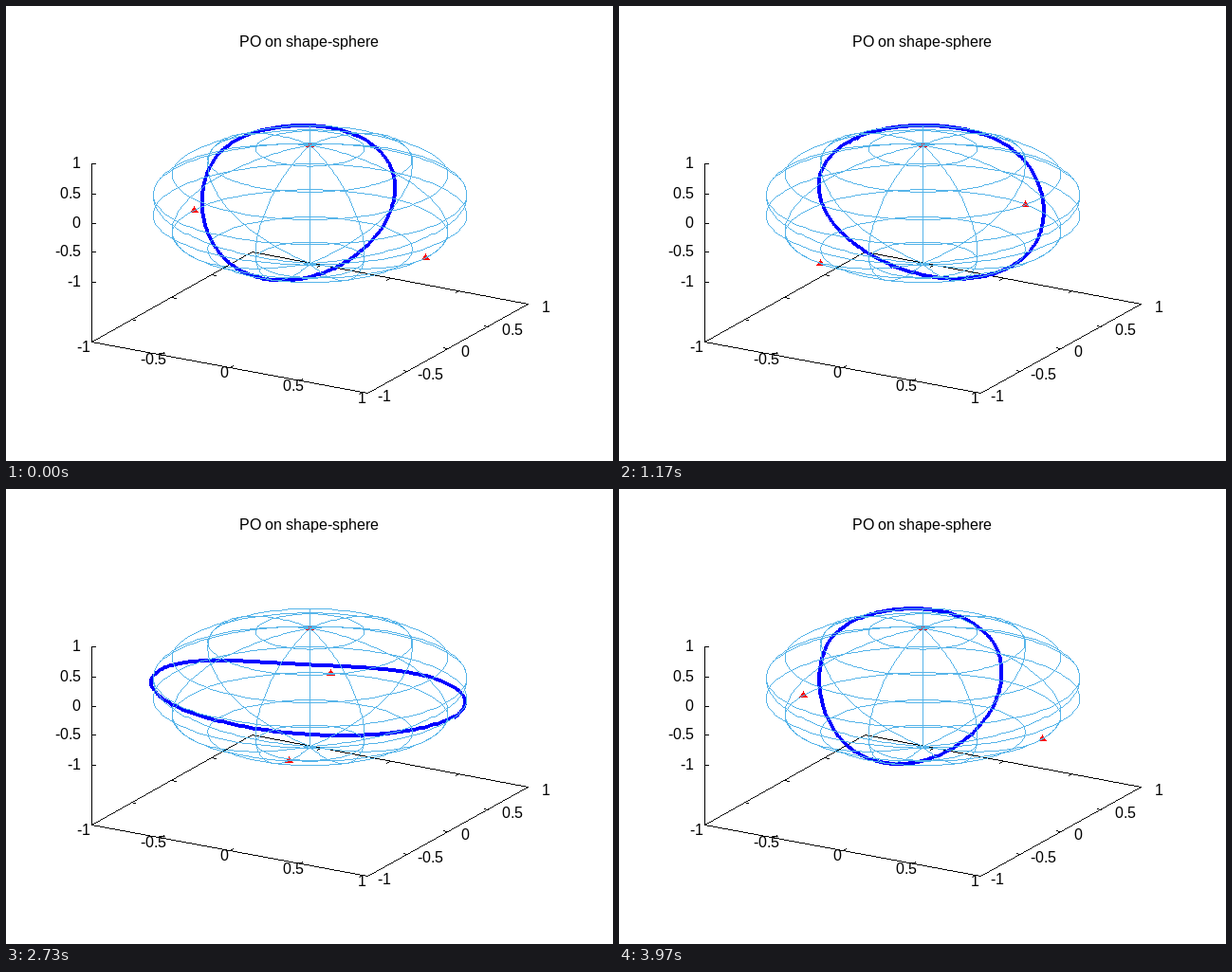
These frames come from a looping animation (640x480 px, 4.01 s). An HTML page with a canvas:

```html
<!DOCTYPE html>
<html lang="en">
<head>
<meta charset="utf-8">
<title>PO on shape-sphere</title>
<style>
html, body { margin: 0; width: 100%; height: 100%; overflow: hidden; background: #fff; }
canvas { display: block; }
</style>
</head>
<body>
<canvas id="stage" width="640" height="480"></canvas>
<script>
const W = 640, H = 480, LOOP = 4010, FRAMES = 120;
const RAD = Math.PI / 180;
const ctx = document.getElementById('stage').getContext('2d');

// View tilted by 60 and turned by 30 degrees, on whole pixels around the centre
const SX = 168.5, SY = 109, FLOOR = -2, MID = -0.5;
const C30 = Math.cos(30 * RAD), S30 = 0.5;
const project = (x, y, z) => [
  W / 2 + Math.trunc(SX * (x * C30 + y * S30)),
  H / 2 + Math.trunc(SY * ((x * S30 - y * C30) / 2 - C30 * (z - MID) / 1.5))
];

function layer() {
  const c = document.createElement('canvas');
  c.width = W;
  c.height = H;
  return c.getContext('2d');
}

// Hard-edged line, widened across its main direction
function line(g, a, b, thick = 1) {
  const [x0, y0] = a.map(Math.round), [x1, y1] = b.map(Math.round);
  const dx = x1 - x0, dy = y1 - y0;
  const n = Math.max(Math.abs(dx), Math.abs(dy));
  const flat = Math.abs(dx) >= Math.abs(dy);
  const wide = n ? Math.floor(thick * Math.hypot(dx, dy) / n + 1e-6) : thick;
  const shift = wide >> 1;
  for (let i = 0; i <= n; i++) {
    const x = Math.round(x0 + (n ? dx * i / n : 0));
    const y = Math.round(y0 + (n ? dy * i / n : 0));
    if (flat) g.fillRect(x, y - shift, 1, wide);
    else g.fillRect(x - shift, y, wide, 1);
  }
}

function path(g, at, steps, thick) {
  let last = at(0);
  for (let i = 1; i <= steps; i++) {
    const next = at(i / steps);
    line(g, last, next, thick);
    last = next;
  }
}

// Text with every glyph on a whole pixel; align: 0 left, 0.5 centre, 1 right
function label(g, text, x, y, align) {
  const chars = [...text];
  const steps = chars.map(c => Math.round(g.measureText(c).width));
  let pen = Math.round(x - align * steps.reduce((a, b) => a + b));
  chars.forEach((c, i) => {
    g.fillText(c, pen, y);
    pen += steps[i];
  });
}

function drawAxes(g) {
  g.fillStyle = '#000';
  const TIC = 4;
  const floor = (x, y) => project(x, y, FLOOR);
  const corners = [floor(-1, -1), floor(1, -1), floor(1, 1), floor(-1, 1)];
  corners.forEach((c, i) => line(g, c, corners[(i + 1) % 4]));
  line(g, corners[0], project(-1, -1, 1));

  const tic = ([x, y], dx, dy) => line(g, [x, y], [x + dx * TIC, y + dy * TIC]);
  g.font = '16px "Liberation Sans", Arial, sans-serif';
  label(g, 'PO on shape-sphere', 319.5, 43, 0.5);

  for (const v of [-1, -0.5, 0, 0.5, 1]) {
    const text = (v < 0 ? '' : ' ') + v;
    const px = floor(v, -1), py = floor(1, v), pz = project(-1, -1, v);
    if (Math.abs(v) < 1) {
      tic(px, 0.87, -0.48);
      tic(floor(v, 1), -0.87, 0.48);
      tic(floor(-1, v), 0.98, 0.18);
      tic(py, -0.98, -0.18);
    }
    tic(pz, 1, 0);
    label(g, text, px[0] - 8, px[1] + 11, 0.5);
    label(g, text, py[0] + 11, py[1] + 9, 0);
    label(g, text, pz[0] - 11, pz[1] + 5, 1);
  }
}

function drawSphere(g) {
  g.fillStyle = '#56b4e9';
  const at = (lon, lat) => project(
    Math.cos(lat * RAD) * Math.cos(lon * RAD),
    Math.cos(lat * RAD) * Math.sin(lon * RAD),
    Math.sin(lat * RAD)
  );
  for (let lat = -70; lat <= 70; lat += 20) path(g, t => at(360 * t, lat), 99);
  for (let lon = 0; lon < 360; lon += 40) path(g, t => at(lon, 180 * t - 90), 99);
}

// Point of the orbit on the unit sphere, symmetric in y
function orbit(t) {
  const s = 2 * Math.PI * t;
  const x = -0.12 - 0.355 * Math.cos(s) - 0.05 * Math.cos(2 * s) - 0.01 * Math.cos(3 * s);
  const r = Math.sqrt(1 - x * x);
  return [x, r * Math.sin(s), r * Math.cos(s)];
}

function marker([x, y]) {
  ctx.fillStyle = '#f00';
  [0, 0, 1, 2, 2, 3, 4].forEach((half, i) =>
    ctx.fillRect(x - half, y - 4 + i, 2 * half + 1, 1));
}

const back = layer(), grid = layer();
back.fillStyle = '#fff';
back.fillRect(0, 0, W, H);
drawAxes(back);
drawSphere(grid);

function draw(step) {
  const turn = -3 * (step + 1) * RAD;
  const c = Math.cos(turn), s = Math.sin(turn);
  const spin = ([x, y, z]) => project(x * c - y * s, x * s + y * c, z);
  const side = Math.sqrt(3) / 2;

  ctx.drawImage(back.canvas, 0, 0);
  ctx.fillStyle = '#00f';
  path(ctx, t => spin(orbit(t)), 240, 4);
  [[0, 0, 1], [side, 0, -0.5], [-side, 0, -0.5]].forEach(p => marker(spin(p)));
  ctx.drawImage(grid.canvas, 0, 0);
}

// Three steps per 100 ms, at 0, 30 and 70
function stepAt(ms) {
  const t = ms % LOOP, rest = t % 100;
  const k = 3 * Math.floor(t / 100) + (rest >= 70 ? 2 : rest >= 30 ? 1 : 0);
  return Math.min(k, FRAMES - 1);
}

let shown = -1;
function tick() {
  const step = stepAt(performance.now());
  if (step !== shown) draw(shown = step);
  requestAnimationFrame(tick);
}
tick();
</script>
</body>
</html>
```
